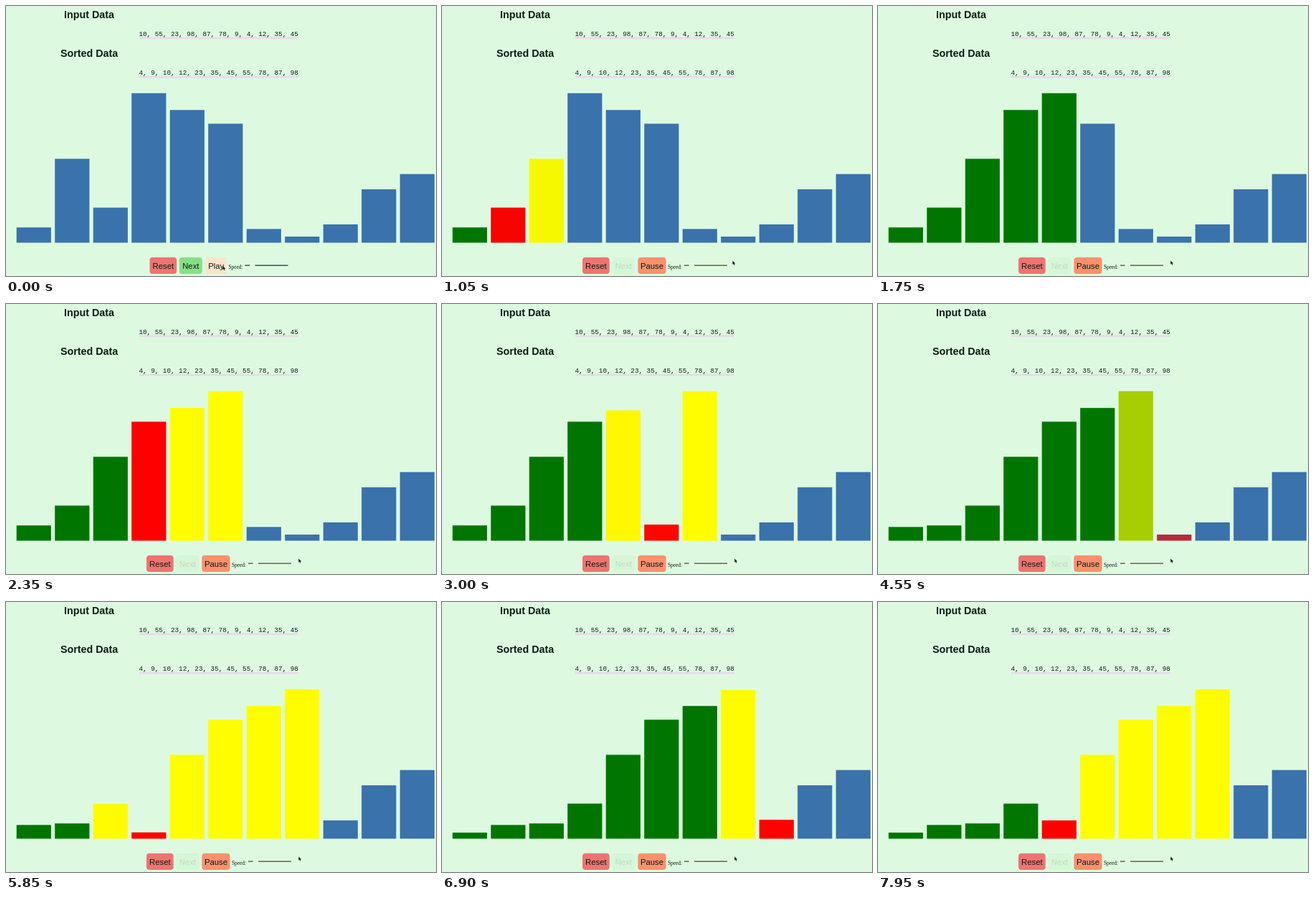
Animation of 600 by 377 pixels, one loop 8000 ms. Source, as an HTML page with a canvas:

```html
<!DOCTYPE html>
<html lang="en">
<head>
<meta charset="utf-8">
<title>Insertion sort</title>
<style>
  html, body { margin: 0; width: 100%; height: 100%; overflow: hidden; background: #ddfae1; }
  canvas { display: block; width: 600px; height: 377px; }
</style>
</head>
<body>
<canvas id="stage"></canvas>
<script>
const W = 600, H = 377, LOOP = 8000;
const CLICK = 275, FIRST_STEP = 425, PERIOD = 150.3, FADE = 122;
const SANS = '"Liberation Sans", Arial, sans-serif';
const MONO = '"Liberation Mono", "Courier New", monospace';
const SERIF = '"Liberation Serif", "Times New Roman", serif';
const INK = '#0b1c14', BG = '#ddfae1';
const BLUE = [58, 114, 171], GREEN = [0, 118, 0], YELLOW = [255, 253, 0], RED = [255, 0, 0];

const data = [10, 55, 23, 98, 87, 78, 9, 4, 12, 35, 45];
const sorted = [...data].sort((a, b) => a - b);

const canvas = document.getElementById('stage');
const ctx = canvas.getContext('2d');
const ratio = window.devicePixelRatio || 1;
canvas.width = W * ratio;
canvas.height = H * ratio;
ctx.scale(ratio, ratio);

const clamp = v => Math.min(1, Math.max(0, v));
const ease = p => p < 0.5 ? 4 * p ** 3 : 1 - (2 - 2 * p) ** 3 / 2;
const mix = (a, b, p) => a + (b - a) * p;

// Every step is a full snapshot of the bars: value and colour per slot.
function sortSteps(values) {
  const bars = values.map(value => ({ value, color: BLUE }));
  const steps = [];
  const save = () => steps.push(bars.map(bar => ({ ...bar })));
  save();
  for (let i = 0; i < bars.length; i++) {
    for (let j = i; j > 0 && bars[j - 1].value > bars[j].value; j--) {
      bars[j - 1].color = YELLOW;
      bars[j].color = RED;
      save();
      [bars[j - 1], bars[j]] = [bars[j], bars[j - 1]];
      save();
    }
    for (let k = 0; k <= i; k++) bars[k].color = GREEN;
    save();
  }
  return steps;
}
const steps = sortSteps(data);

function text(str, x, y, font, color = INK, align = 'left') {
  ctx.font = font;
  ctx.fillStyle = color;
  ctx.textAlign = align;
  ctx.fillText(str, x, y);
}

function rect(x, y, w, h, color) {
  ctx.fillStyle = color;
  ctx.fillRect(x, y, w, h);
}

function drawList(title, values, y) {
  text(title, 116, y, `bold 14.3px ${SANS}`, INK, 'center');
  rect(186, y + 26.4, 222, 2.8, '#e9d9ec');
  text(values.join(', '), 185.5, y + 25, `9.27px ${MONO}`);
}

function drawBars(t) {
  const pos = (t - FIRST_STEP) / PERIOD;
  const index = Math.min(steps.length - 1, Math.max(0, Math.floor(pos) + 1));
  const to = steps[index], from = steps[Math.max(0, index - 1)];
  const started = t - FIRST_STEP - (index - 1) * PERIOD;
  const p = ease(clamp(started / FADE));
  to.forEach((bar, i) => {
    const h = mix(from[i].value, bar.value, p) * 2.13;
    const rgb = bar.color.map((c, n) => Math.round(mix(from[i].color[n], c, p)));
    rect(14.7 + i * 53.5, 330.5 - h, 48.2, h, `rgb(${rgb})`);
  });
}

function button(label, x, w, fill, color = INK) {
  ctx.fillStyle = fill;
  ctx.beginPath();
  ctx.roundRect(x, 351, w, 23, 4);
  ctx.fill();
  text(label, x + w / 2, 367, `11.3px ${SANS}`, color, 'center');
}

function drawControls(playing) {
  const x = playing ? 196 : 200.5;
  button('Reset', x, 37.7, '#ee7470');
  if (playing) {
    button('Next', x + 41.3, 32, '#d5f6d7', '#bfdcc4');
    button('Pause', x + 77.3, 39.3, '#fb906c');
  } else {
    button('Next', x + 41.3, 32, '#88e085');
    button('Play', x + 77.7, 30, '#f9e5cd');
  }
  const left = playing ? 315 : 310.5;
  text('Speed:', left, 366.5, `7.3px ${SERIF}`);
  rect(left + 23, 361.5, 60, 1.5, playing ? '#66654a' : '#3d5050');
  ctx.fillStyle = '#e2f8e6';
  ctx.beginPath();
  ctx.arc(left + 33.3, 362.5, 3.7, 0, Math.PI * 2);
  ctx.fill();
}

function drawCursor(t) {
  const p = ease(clamp((t - 400) / 800));
  ctx.save();
  ctx.translate(mix(302.5, 408.3, p), mix(363, 355.5, p));
  ctx.fillStyle = '#111';
  ctx.beginPath();
  [[0, 0], [0, 5.2], [1.2, 4.2], [2.1, 6.2], [3, 5.8], [2.2, 3.9], [3.7, 3.8]]
    .forEach(([x, y]) => ctx.lineTo(x, y));
  ctx.fill();
  ctx.restore();
}

function frame() {
  const t = performance.now() % LOOP;
  rect(0, 0, W, H, BG);
  drawList('Input Data', data, 17);
  drawList('Sorted Data', sorted, 71.3);
  drawBars(t);
  drawControls(t >= CLICK);
  drawCursor(t);
  requestAnimationFrame(frame);
}
frame();
</script>
</body>
</html>
```
